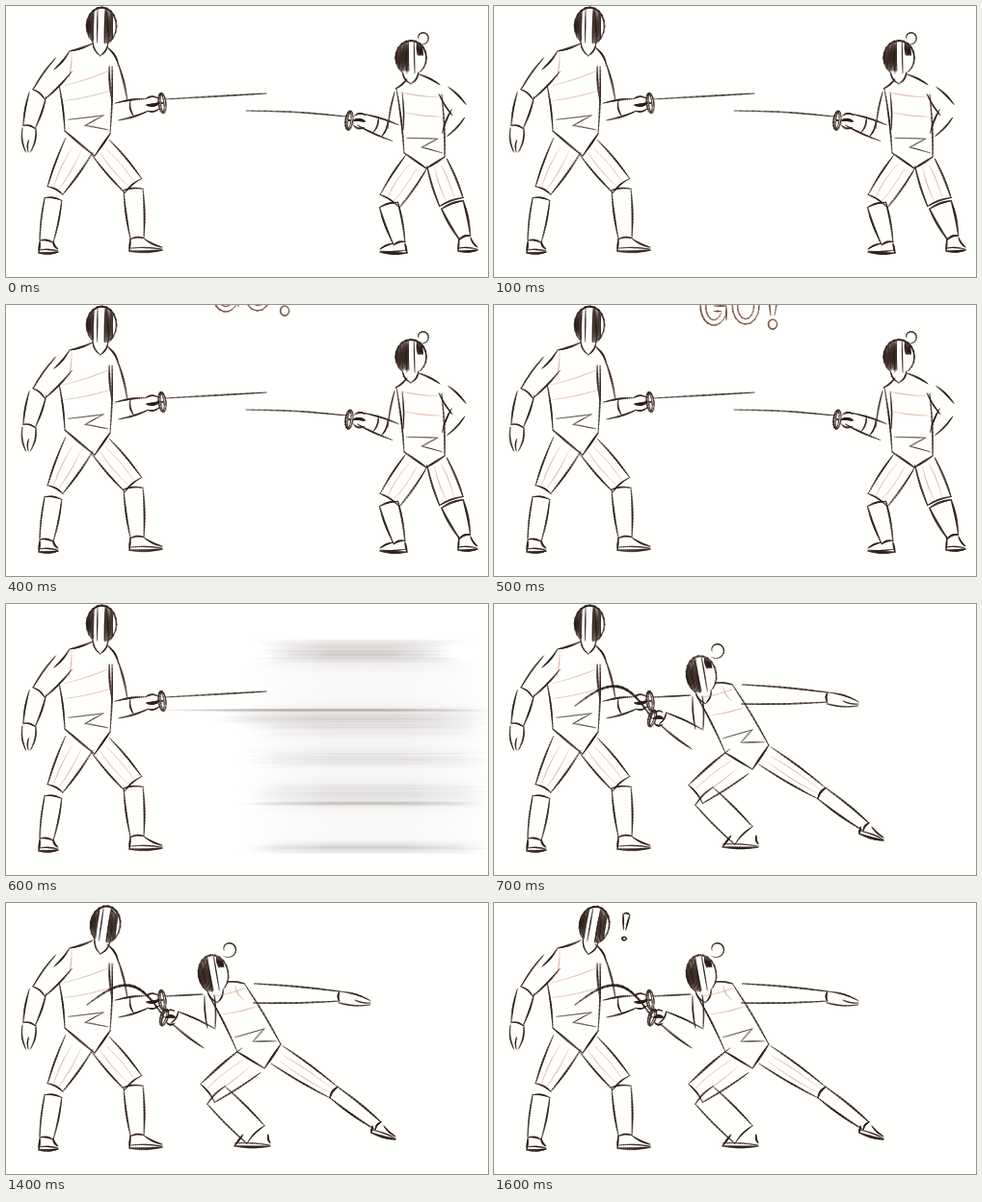
Animation, 500 px wide and 282 px high, one loop 2.1 s. Source, as an HTML page with a canvas:

```html
<!DOCTYPE html>
<html lang="en">
<head>
<meta charset="utf-8">
<title>Fencing bout</title>
<style>
html, body { margin: 0; width: 100%; height: 100%; overflow: hidden; background: #fffffe; }
canvas { display: block; width: 500px; height: 282px; }
</style>
</head>
<body>
<canvas id="stage"></canvas>
<script>
const W = 500, H = 282, LOOP = 2100, TICK = 100;
const INK = '44,31,26', BROWN = '112,66,48', WARM = '205,145,112';
const canvas = document.getElementById('stage');
const ctx = canvas.getContext('2d');
const dpr = window.devicePixelRatio || 1;
canvas.width = W * dpr;
canvas.height = H * dpr;

let seed = 1;
const random = () => (seed = seed * 16807 % 2147483647) / 2147483647;
const jitter = r => (random() * 2 - 1) * r;
const mix = (a, b, t) => [a[0] + (b[0] - a[0]) * t, a[1] + (b[1] - a[1]) * t];
const shift = (p, n, d) => [p[0] + n[0] * d, p[1] + n[1] * d];
const bell = (x, width) => Math.exp(-x * x / (width * width));

function normal(a, b) {
  const dx = b[0] - a[0], dy = b[1] - a[1], len = Math.hypot(dx, dy) || 1;
  return [-dy / len, dx / len];
}

// Pencil line along at(t): pressure and darkness vary on the way
function pencil(at, w, color = INK, alpha = 0.95) {
  const phase = random() * 6, steps = 16;
  for (let i = 0; i < steps; i++) {
    const t = (i + 0.5) / steps;
    ctx.strokeStyle = `rgba(${color},${alpha * (0.84 + 0.16 * Math.sin(phase + 5 * t))})`;
    ctx.lineWidth = w * (0.5 + 0.5 * Math.sin(Math.PI * t));
    ctx.beginPath();
    ctx.moveTo(...at(i / steps));
    ctx.lineTo(...at((i + 1) / steps));
    ctx.stroke();
  }
}

function bowed(a, b, bow) {
  const n = normal(a, b);
  return t => shift(mix(a, b, t), n, bow * Math.sin(Math.PI * t));
}

function stroke(a, b, w = 1.7, bow = 0) {
  const loose = p => [p[0] + jitter(0.8), p[1] + jitter(0.8)];
  pencil(bowed(loose(a), loose(b), bow + jitter(0.6)), w * 0.8, BROWN, 0.4);
  pencil(bowed(a, b, bow), w);
}

const soft = (a, b, bow = 0) => pencil(bowed(a, b, bow), 1, WARM, 0.65);

function arc(c, rx, ry, tilt, from, to, w, color = INK) {
  const cos = Math.cos(tilt), sin = Math.sin(tilt);
  const at = t => {
    const angle = from + (to - from) * t;
    const x = rx * Math.cos(angle), y = ry * Math.sin(angle);
    return [c[0] + x * cos - y * sin, c[1] + x * sin + y * cos];
  };
  pencil(t => shift(at(t), [0.6, 0.4], 1), w * 0.8, BROWN, 0.4);
  pencil(at, w, color);
}

// Tube from a to b with half widths ra and rb, cross bands at the given places
function limb(a, b, ra, rb, { w = 1.7, swell = 1, bands = [], seam = false } = {}) {
  const n = normal(a, b);
  const edge = (t, side) => shift(mix(a, b, t), n, side * (ra + (rb - ra) * t));
  for (const side of [1, -1]) stroke(edge(0, side), edge(1, side), w, side * swell);
  for (const t of bands) stroke(edge(t, 1), edge(t, -1), w * 0.9, -1.5);
  if (seam) for (const s of [0.35, -0.3]) soft(edge(0.1, s), edge(0.95, s), s * 4);
}

const thigh = (a, b, ra, rb, w) => limb(a, b, ra, rb, { w, bands: [1], seam: true });
const shin = (a, b, ra, rb, w) => limb(a, b, ra, rb, { w, bands: [0, 1] });

function mitt(a, b, r) {
  limb(a, b, r, r * 0.35, { w: 1.5, swell: r * 0.3 });
  stroke(mix(a, b, 0.5), b, 1.2, 1);
}

function shoe(ankle, r, heel, toe) {
  const dir = Math.sign(toe[0] - heel[0]), up = [0, -1];
  stroke([ankle[0] - dir * r, ankle[1]], heel, 1.7);
  stroke([ankle[0] + dir * r, ankle[1]], shift(toe, up, 3), 1.7, 1);
  stroke(heel, toe, 2.5, dir);
  stroke(shift(heel, up, 3), shift(toe, up, 1), 1.3, -1);
}

function torso(l0, l1, r0, r1, crotch) {
  const on = (s, t) => mix(mix(l0, l1, t), mix(r0, r1, t), s);
  stroke(l0, l1, 1.7, -1);
  stroke(r0, r1, 1.7, -1);
  stroke(l1, crotch, 1.9);
  stroke(crotch, r1, 2);
  for (const t of [0.05, 0.36]) soft(on(0.08, t), on(0.95, t), 1);
  const fold = [on(0.1, 0.76), on(0.85, 0.72), on(0.45, 0.88), on(0.95, 0.94)];
  fold.slice(1).forEach((p, i) => stroke(fold[i], p, 0.9));
}

function sword(guard, tilt, r, tip, bow, w) {
  arc(guard, 3.8, r, tilt, 0, 6.6, 1.6);
  arc(guard, 1.8, r * 0.85, tilt, 0, 6.6, 1.3);
  pencil(bowed(guard, tip, bow), w);
}

function grip(a, b) {
  limb(a, b, 6.5, 5, { w: 1.5, swell: 2 });
  stroke(a, b, 3.2, 1);
}

// Fencing mask; each patch is a dark area [left, right, bottom] in mask units
function mask(c, rx, ry, tilt, chin, patches) {
  ctx.save();
  ctx.translate(...c);
  ctx.rotate(tilt);
  arc([0, 0], rx, ry, 0, 2.2, 7.2, 2);
  for (const [left, right, bottom] of patches) {
    for (let x = left * rx; x < right * rx; x += 1.25) {
      const reach = ry * Math.sqrt(1 - (x / rx) ** 2);
      stroke([x, -reach * 0.92], [x + 0.7, Math.min(bottom * ry, reach)], 1.6, 0.5);
    }
  }
  stroke([-0.3 * rx, -0.85 * ry], [-0.25 * rx, 0.9 * ry], 1.2);
  stroke([0.2 * rx, -0.9 * ry], [0.25 * rx, 0.9 * ry], 1.2);
  stroke([-0.55 * rx, 0.82 * ry], [0, chin], 1.4, 2);
  stroke([0.5 * rx, 0.82 * ry], [0, chin], 1.4, -2);
  ctx.restore();
}

function curl(c, r) {
  pencil(t => {
    const angle = 2.2 - 5.6 * t, k = r * (1 - 0.45 * t);
    return [c[0] + k * Math.cos(angle), c[1] + k * Math.sin(angle)];
  }, 1.4);
}

function man(nod, tip) {
  seed = 7;
  mask([99 + nod * 5, 21 + nod * 2], 15.5, 19.5, 0.04 + nod * 0.16, 31,
    [[-0.95, -0.5, 0.8], [0.25, 0.8, 0.9]]);
  stroke([90, 39], [66, 47], 1.8, -1);
  stroke([66, 47], [50, 66], 1.8, -1);
  soft([68, 48], [65, 76], -1);
  stroke([105, 43], [117, 62], 1.8, -2);
  limb([60, 61], [34, 92], 11, 8, { bands: [1] });
  limb([33, 92], [24, 126], 9, 6.5, { bands: [1] });
  mitt([24, 127], [23, 152], 7);
  limb([112, 62], [118, 99], 5, 8);
  limb([115, 110], [146, 103], 9, 6.5, { bands: [0.5] });
  grip([146, 103], [159, 101]);
  sword([162, 101], -0.12, 10.5, [162, 101], 0, 1);
  pencil(bowed([165, 97], tip, 0), 1.8);
  torso([55, 82], [61, 130], [110, 63], [108, 133], [92, 156]);
  thigh([76, 145], [51, 192], 16, 9);
  shin([49, 201], [42, 245], 9, 7);
  shoe([42, 245], 7, [34, 257], [54, 256]);
  thigh([98, 147], [132, 187], 12, 11.5);
  shin([132, 191], [136, 242], 10, 7);
  shoe([136, 242], 7, [128, 255], [162, 254]);
}

function onGuard() {
  seed = 21;
  mask([420, 54], 16, 18, 0, 27, [[-0.95, -0.1, 0.75], [0.42, 0.8, -0.15]]);
  curl([432, 33], 7.5);
  stroke([416, 76], [404, 86], 1.7, -1);
  stroke([428, 71], [450, 82], 1.8, -1);
  limb([407, 90], [404, 128], 4, 8, { w: 1.5 });
  limb([404, 132], [367, 118], 9, 6.5, { bands: [0.3, 0.55] });
  grip([372, 120], [361, 119]);
  sword([356, 119], 0.12, 10, [356, 119], 0, 1);
  pencil(bowed([353, 115], [249, 109], 1.5), 1.7);
  limb([454, 88], [470, 108], 6, 9);
  limb([469, 112], [455, 134], 8, 3);
  torso([405, 86], [413, 153], [452, 92], [455, 157], [436, 169]);
  thigh([425, 163], [398, 203], 13, 12);
  shin([397, 207], [408, 247], 10, 6, 2);
  shoe([408, 247], 6, [416, 257], [388, 256]);
  thigh([447, 163], [462, 204], 11, 13, 2);
  shin([463, 207], [476, 241], 12, 6, 2.3);
  shoe([476, 241], 6, [469, 255], [489, 254]);
}

function lunge() {
  seed = 33;
  mask([215, 74], 15.5, 20, -0.15, 30, [[-0.95, -0.2, 0.85], [0.4, 0.75, -0.3]]);
  curl([231, 48], 9);
  stroke([229, 82], [248, 84], 1.6, -1);
  soft([238, 86], [247, 101], 2);
  limb([257, 94], [346, 97], 10, 5, { w: 1.9, bands: [1] });
  mitt([346, 98], [378, 104], 6);
  limb([211, 96], [213, 130], 5, 4, { w: 1.5 });
  limb([211, 141], [175, 119], 11.5, 7, { bands: [1] });
  grip([175, 119], [166, 119]);
  sword([164, 119], 0.3, 9, [84, 106], 27, 2.7);
  torso([210, 95], [240, 155], [248, 85], [285, 147], [268, 172]);
  thigh([254, 164], [209, 198], 16, 12);
  shin([218, 200], [259, 241], 13, 13);
  shoe([259, 241], 13, [237, 253], [274, 253]);
  thigh([281, 158], [340, 197], 11, 7);
  shin([340, 197], [386, 232], 7, 5, 2);
  shoe([386, 232], 6, [379, 239], [404, 246]);
}

function goSign(y) {
  seed = 5;
  for (const gap of [0, 5.5]) {
    arc([228, y], 14 - gap, 20 - gap, 0, 5.4, 0.5, 1.5, BROWN);
    arc([261, y], 14 - gap, 19 - gap, 0, 0, 6.5, 1.5, BROWN);
    pencil(bowed([228, y + gap], [241 - gap, y + gap], 0), 1.4, BROWN);
  }
  pencil(bowed([241, y], [241, y + 15], 0), 1.4, BROWN);
  for (const side of [-1, 1]) {
    pencil(bowed([290 + side * 6, y - 18], [289 + side * 2, y + 10], 0), 1.5, BROWN);
  }
  arc([289, y + 19], 4.5, 5, 0, 0, 6.5, 1.5, BROWN);
}

function alarm() {
  limb([137.5, 12], [135.5, 28], 3.5, 1, { w: 1.5, swell: 0, bands: [0] });
  arc([135, 37], 2.2, 1.7, 0, 0, 6.5, 1.6);
}

// Speed lines: one soft row per pixel, darker near the key heights
function rush() {
  seed = 11;
  for (let y = 37; y < 260; y++) {
    const blade = bell(y - 110, 1.5), head = bell(y - 49, 12);
    const bands = 0.22 * head + 0.18 * bell(y - 122, 13) + 0.12 * bell(y - 160, 9) +
      0.14 * bell(y - 197, 12) + 0.24 * bell(y - 207, 2) + 0.2 * bell(y - 253, 5);
    const alpha = 0.04 + bands * (0.7 + 0.6 * random()) + 0.4 * blade;
    const x0 = 248 + 20 * head - 88 * blade - 30 * bell(y - 118, 8) + jitter(8);
    const x1 = 505 - 45 * head + jitter(8);
    const g = ctx.createLinearGradient(x0, 0, x1, 0);
    for (const s of [0, 0.15, 0.35, 0.65, 0.85, 1]) {
      g.addColorStop(s, `rgba(84,70,68,${alpha * Math.sin(Math.PI * s) ** 0.8})`);
    }
    ctx.fillStyle = g;
    ctx.fillRect(x0, y, x1 - x0, 1);
  }
}

function draw(t) {
  ctx.setTransform(dpr, 0, 0, dpr, 0, 0);
  ctx.fillStyle = '#fffffe';
  ctx.fillRect(0, 0, W, H);
  ctx.lineCap = 'round';
  const nod = t < 1200 ? 0 : Math.min(1, 0.6 + (t - 1200) / 1000);
  man(nod, t < 700 ? [270, 91] : [204, 95]);
  if (t < 600) {
    onGuard();
    if (t >= 400) goSign(t < 500 ? -13 : 1);
  } else if (t < 700) {
    rush();
  } else {
    lunge();
    if (t >= 1500) alarm();
  }
}

const start = performance.now();
let shown = -1;
function tick() {
  const step = Math.floor(((performance.now() - start) % LOOP) / TICK);
  if (step !== shown) draw((shown = step) * TICK);
  requestAnimationFrame(tick);
}
tick();
</script>
</body>
</html>
```
